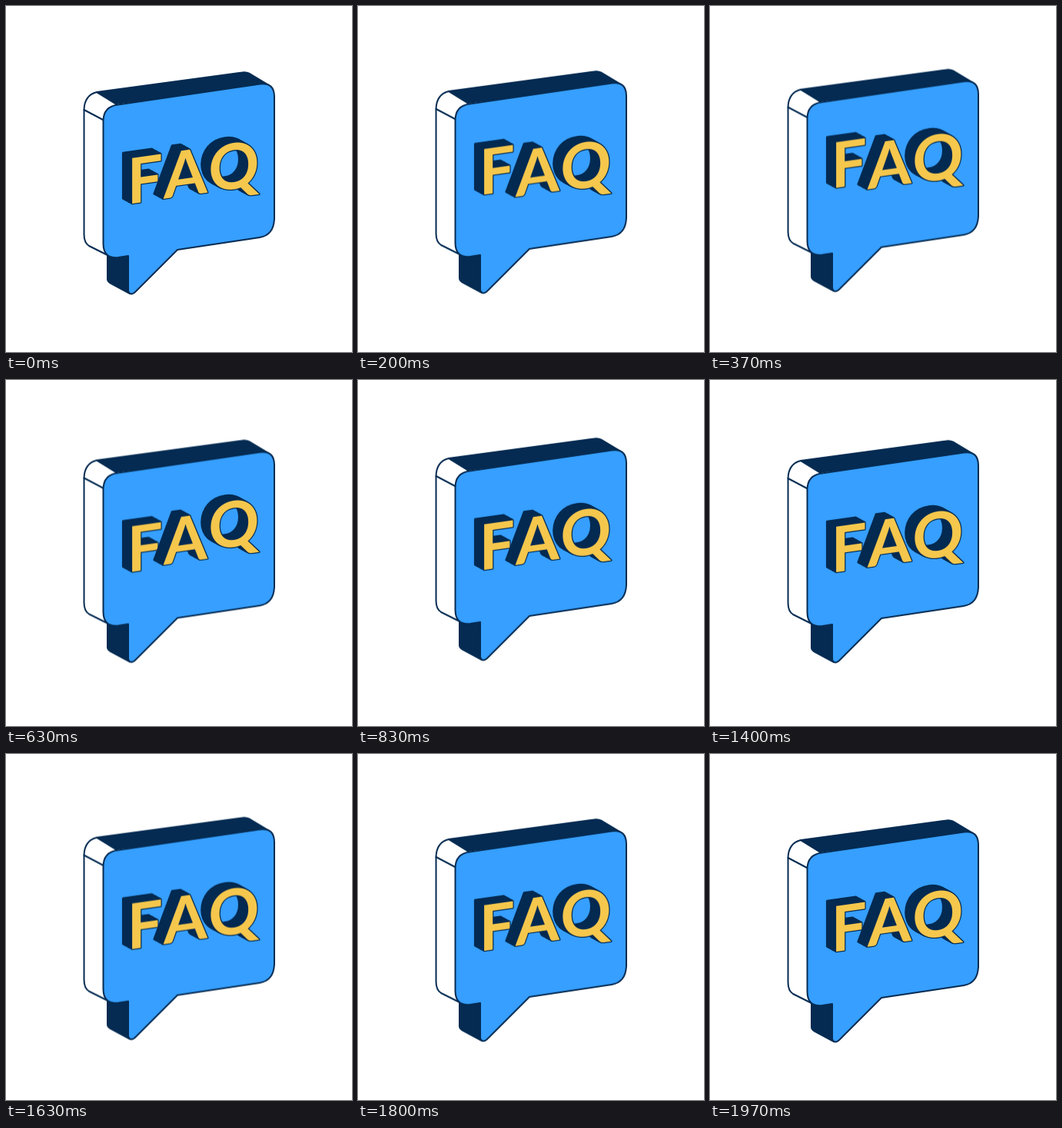
An HTML page for the animation above (2000 ms loop, 450x450 px).

```html
<!DOCTYPE html>
<html lang="en">
<head>
<meta charset="utf-8">
<title>FAQ bubble</title>
<style>
  html, body { margin: 0; width: 100%; height: 100%; overflow: hidden; background: #fff; }
  svg { display: block; width: 100vw; height: 100vh; }
  .line { stroke: #052b52; stroke-width: 2; stroke-linejoin: round; stroke-linecap: round; }
  .navy { fill: #052b52; }
  .white { fill: #fff; }
  .blue { fill: #369fff; }
  text {
    font: 700 82px Lato, "Open Sans", sans-serif;
    stroke: #052b52;
    stroke-width: 2.4;
    stroke-linejoin: round;
    paint-order: stroke;
  }
  .face { fill: #f5c74c; }

  .bubble { animation: bob 2s cubic-bezier(.333, 0, .667, 1) infinite; }
  .letter { animation: hop 2s cubic-bezier(.333, 0, .667, 1) var(--delay) infinite; }

  @keyframes bob {
    50% { transform: translateY(-11px); }
  }
  @keyframes hop {
    0%, 30%, 100% { transform: translateY(0); }
    15% { transform: translateY(var(--height)); }
  }
</style>
</head>
<body>
<svg viewBox="0 0 450 450">
  <g class="bubble">
    <!-- tail side, left side, top side -->
    <path class="line navy" d="M132 322V355Q132 358 135 360L161 374L165 325Z"/>
    <path class="line white" d="M101.500 135Q102 116 118 112L145 128L136 326L108 312Q101.500 308 101.500 297Z"/>
    <path class="line navy" d="M118 112L307 86.500Q312 85.500 317 88L342 103L330 104L142 127Z"/>
    <path class="line" fill="none" d="M101.500 135L128 149"/>
    <!-- front -->
    <path class="line blue" d="M126.500 150Q126.500 131 145 128.500L330 101.500Q349 99 349 118V277Q348 298 330 301L223 317L169 371Q162 378 159 371V325L146 327Q126.500 329 126.500 309Z"/>
    <g id="letters"></g>
  </g>
</svg>
<script>
  const NS = "http://www.w3.org/2000/svg";
  const SLOPE = -0.141;
  const DEPTH = 12;
  const RISE = 0.55;

  const letters = [
    { char: "F", x: 157.6, y: 257.9, delay: 33, height: -18 },
    { char: "A", x: 205, y: 250.7, delay: 133, height: -10 },
    { char: "Q", x: 263.2, y: 242.6, delay: 233, height: -18 }
  ];

  function add(parent, name, attrs) {
    const node = document.createElementNS(NS, name);
    for (const key in attrs) node.setAttribute(key, attrs[key]);
    return parent.appendChild(node);
  }

  const root = document.getElementById("letters");
  for (const { char, x, y, delay, height } of letters) {
    const group = add(root, "g", {
      class: "letter",
      style: `--delay:${delay}ms;--height:${height}px`
    });
    // Stack copies from back to front to build the solid side.
    for (let d = DEPTH; d >= 0; d--) {
      add(group, "text", {
        class: d ? "navy" : "face",
        "aria-hidden": d > 0,
        transform: `matrix(1 ${SLOPE} 0 1 ${x - d} ${y - d * RISE})`
      }).textContent = char;
    }
  }
</script>
</body>
</html>
```
